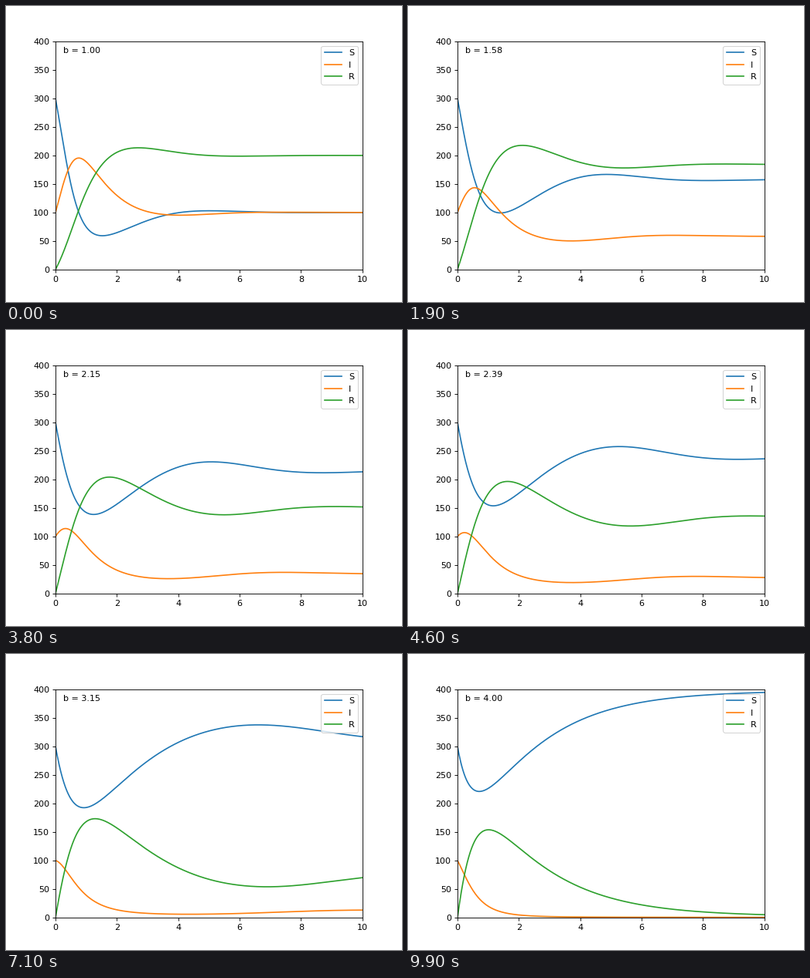
A matplotlib script for the animation above (10 s loop, 512 by 384 pixels).

```python
import numpy as np
import matplotlib.pyplot as plt
from matplotlib.animation import FuncAnimation

FRAMES = 100
INTERVAL = 100
INFECTION = 0.01
IMMUNITY_LOSS = 0.5
START = (300.0, 100.0, 0.0)

b_values = np.linspace(1, 4, FRAMES)
times = np.linspace(0, 10, 1001)


def sirs(y, b):
    s, i, r = y
    caught = INFECTION * s * i
    healed = b * i
    lost = IMMUNITY_LOSS * r
    return np.array([lost - caught, caught - healed, healed - lost])


def solve(b):
    """Integrate the model with RK4 for all values of b at once."""
    h = times[1] - times[0]
    y = np.array(START)[:, None] * np.ones_like(b)
    path = [y]
    for _ in times[1:]:
        k1 = sirs(y, b)
        k2 = sirs(y + h / 2 * k1, b)
        k3 = sirs(y + h / 2 * k2, b)
        k4 = sirs(y + h * k3, b)
        y = y + h / 6 * (k1 + 2 * k2 + 2 * k3 + k4)
        path.append(y)
    return np.array(path)  # time, compartment, b


curves = solve(b_values)

fig, ax = plt.subplots(figsize=(6.4, 4.8), dpi=80)
ax.set_xlim(0, 10)
ax.set_ylim(0, 400)
lines = [ax.plot([], [], label=name)[0] for name in "SIR"]
label = ax.text(0.25, 380, "")
ax.legend(loc="upper right")


def update(frame):
    for k, line in enumerate(lines):
        line.set_data(times, curves[:, k, frame])
    label.set_text(f"b = {b_values[frame]:.2f}")
    return [*lines, label]


anim = FuncAnimation(fig, update, frames=FRAMES, interval=INTERVAL,
                     repeat=True, repeat_delay=0)
plt.show()
```
